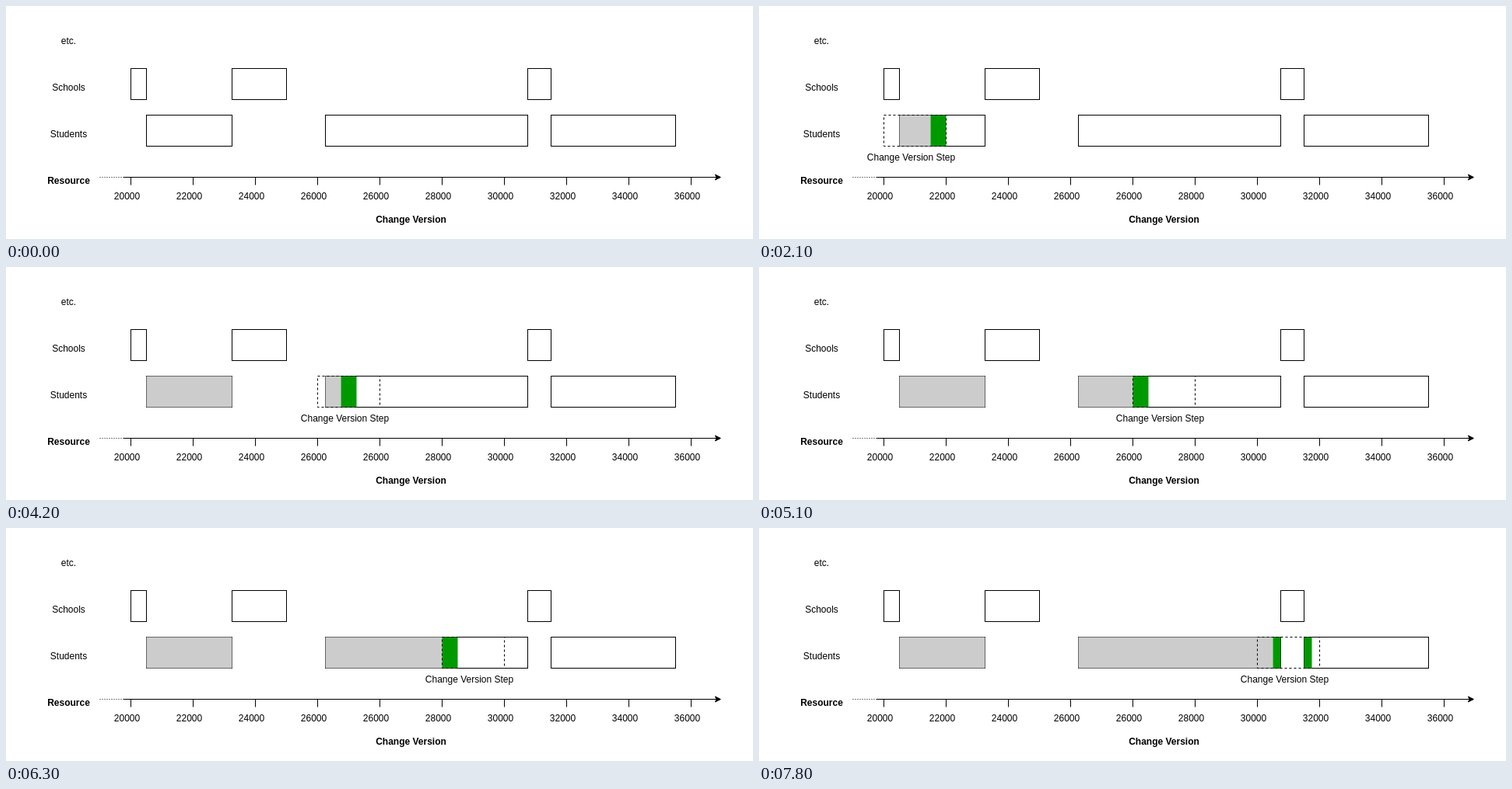
An HTML page that plays this animation: 960x300 px, repeating every 8 s.

```html
<!DOCTYPE html>
<html lang="en">
<head>
<meta charset="utf-8">
<title>Change version steps</title>
<style>
  html, body { margin: 0; width: 100%; height: 100%; overflow: hidden; background: #fff; }
  svg { display: block; }
  text { font: 12px "Liberation Sans", Arial, Helvetica, sans-serif; text-anchor: middle; fill: #000; }
  .bold { font-weight: bold; }
  .line { fill: none; stroke: #000; }
</style>
</head>
<body>
<svg width="960" height="300" viewBox="0 0 960 300">
  <g transform="translate(.5 .5)">
    <g id="chart"></g>
    <g id="done" fill="#ccc"></g>
    <g id="page" fill="#090"></g>
    <g id="step">
      <rect class="line" x="0" y="140" width="80" height="40" stroke-dasharray="3 3"/>
      <text x="35" y="198.5">Change Version Step</text>
    </g>
  </g>
</svg>
<script>
const LOOP = 8000, START = 1500, TICK = 300;
const WINDOW = 80, PAGE = 20;
const schools = [[160, 180], [290, 360], [670, 700]];
const students = [[180, 290], [410, 670], [700, 860]];
const versions = [20, 22, 24, 26, 26, 28, 30, 32, 34, 36];

const byId = id => document.getElementById(id);
const chart = byId("chart"), done = byId("done"), page = byId("page"), step = byId("step");

function add(parent, name, attrs, text = "") {
  const el = document.createElementNS("http://www.w3.org/2000/svg", name);
  for (const key in attrs) el.setAttribute(key, attrs[key]);
  el.textContent = text;
  parent.appendChild(el);
  return el;
}

const label = (text, x, y, cls = "") => add(chart, "text", { x, y, class: cls }, text);
const line = (d, extra) => add(chart, "path", { d, class: "line", ...extra });
const box = (parent, [a, b], y, cls = "") =>
  add(parent, "rect", { x: a, y, width: b - a, height: 40, class: cls });

function drawChart() {
  label("etc.", 80, 48.5);
  label("Schools", 80, 108.5);
  label("Students", 80, 168.5);
  label("Resource", 80, 228.5, "bold");
  label("Change Version", 520, 278.5, "bold");
  schools.forEach(r => box(chart, r, 80, "line"));
  students.forEach(r => box(chart, r, 140, "line"));
  line("M120 220H150", { "stroke-dasharray": "1 2" });
  line("M150 220H912.6");
  line("M917.9 220l-7 3.5 1.75-3.5-1.75-3.5z", { style: "fill:#000", "stroke-miterlimit": 10 });
  versions.forEach((v, i) => {
    line(`M${160 + 80 * i} 220v10`);
    label(v + "000", 155 + 80 * i, 248.5);
  });
}

// Amount of student data left of x.
const dataBefore = x =>
  students.reduce((sum, [a, b]) => sum + Math.max(0, Math.min(b, x) - a), 0);

// Stretches of the row that hold the data from amount lo to amount hi.
function pieces(lo, hi) {
  let base = 0;
  return students.map(([a, b]) => {
    const piece = [Math.max(a, a + lo - base), Math.min(b, a + hi - base)];
    base += b - a;
    return piece;
  }).filter(([a, b]) => b > a);
}

// One entry per tick; a window without a page to read takes one idle tick.
function plan() {
  const ticks = [];
  for (let x = 160; x <= 640; x += WINDOW) {
    const lo = dataBefore(x), hi = dataBefore(x + WINDOW);
    if (x === 240 || lo === hi) ticks.push({ x, lo, hi: lo });
    for (let p = lo; p < hi; p += PAGE) ticks.push({ x, lo: p, hi: Math.min(p + PAGE, hi) });
  }
  return ticks;
}

const ticks = plan();
let shown = null;

function draw(time) {
  const n = Math.floor((time % LOOP - START) / TICK);
  if (n === shown) return;
  shown = n;
  const now = ticks[n];
  done.replaceChildren();
  page.replaceChildren();
  step.style.display = now ? "" : "none";
  if (!now) return;
  step.setAttribute("transform", `translate(${now.x} 0)`);
  pieces(0, now.lo).forEach(r => box(done, r, 140));
  pieces(now.lo, now.hi).forEach(r => box(page, r, 140));
}

function frame() {
  draw(performance.now());
  requestAnimationFrame(frame);
}

drawChart();
frame();
</script>
</body>
</html>
```
